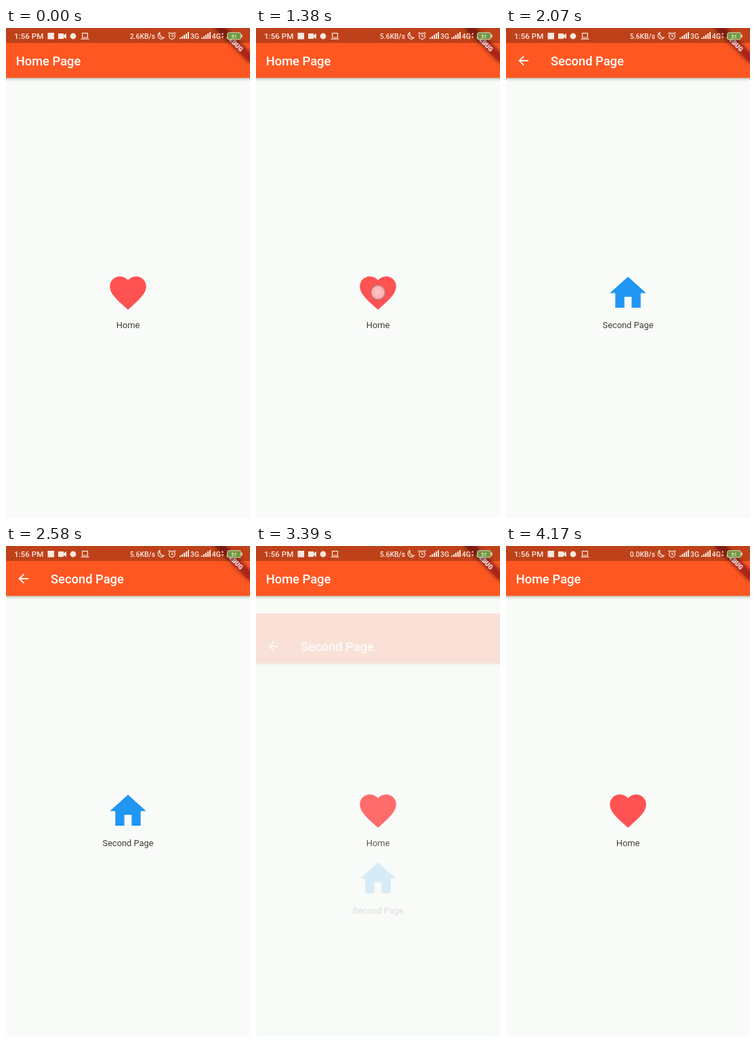
These frames come from a looping animation (360 px wide and 720 px high, 4.2 s). An HTML page:

```html
<!DOCTYPE html>
<html lang="en">
<head>
<meta charset="utf-8">
<title>Page transition</title>
<style>
  html, body { margin: 0; width: 100%; height: 100%; overflow: hidden; background: #f8fbf8; }
  svg { display: block; width: 360px; height: 720px; overflow: hidden; }
  text { font-family: Roboto, "Open Sans", sans-serif; }

  .page { fill: #f8fbf8; }
  .bar { fill: #ff5722; }
  .title { font-size: 18.33px; font-weight: 500; fill: #fff; }
  .label { font-size: 12.83px; fill: #3f3c38; text-anchor: middle; }
  .heart { fill: #ff5252; }
  .house { fill: #2196f3; }

  .status { fill: #fbe8e0; }
  .status text { font-size: 10.4px; font-weight: 500; }
  .status .clock { font-size: 11.6px; }
  .status .charge { font-size: 7.5px; text-anchor: middle; }
  .line { fill: none; stroke: #fbe8e0; stroke-width: 1.2; }
  .debug { font-size: 9.35px; font-weight: 900; fill: #fff; text-anchor: middle; }

  /* One loop is 4200 ms; the page takes 300 ms each way. */
  .second { animation: slide 4.2s infinite, fade 4.2s infinite; }
  .touch, .speed text { opacity: 0; animation: 4.2s step-end infinite; }
  .touch { animation-name: press; }
  .speed .a { animation-name: speedA; }
  .speed .b { animation-name: speedB; }
  .speed .c { animation-name: speedC; }

  @keyframes slide {
    0% { transform: translateY(180px); }
    35.238% { transform: translateY(180px); animation-timing-function: cubic-bezier(.4, 0, .2, 1); }
    42.381% { transform: translateY(0); }
    75.952% { transform: translateY(0); animation-timing-function: cubic-bezier(.8, 0, .6, 1); }
    83.095%, 100% { transform: translateY(180px); }
  }
  @keyframes fade {
    0% { opacity: 0; }
    35.238% { opacity: 0; animation-timing-function: cubic-bezier(.42, 0, 1, 1); }
    42.381% { opacity: 1; }
    75.952% { opacity: 1; animation-timing-function: cubic-bezier(0, 0, .58, 1); }
    83.095%, 100% { opacity: 0; }
  }
  @keyframes press { 0% { opacity: 0; } 32.1% { opacity: 1; } 35.2%, 100% { opacity: 0; } }
  @keyframes speedA { 0% { opacity: 1; } 7.85%, 100% { opacity: 0; } }
  @keyframes speedB { 0% { opacity: 0; } 7.85% { opacity: 1; } 90.7%, 100% { opacity: 0; } }
  @keyframes speedC { 0% { opacity: 0; } 90.7%, 100% { opacity: 1; } }
</style>
</head>
<body>
<svg viewBox="0 0 360 720" width="360" height="720">
  <defs>
    <linearGradient id="shade" x1="0" y1="0" x2="0" y2="1">
      <stop offset="0" stop-color="#000" stop-opacity=".26"/>
      <stop offset=".4" stop-color="#000" stop-opacity=".1"/>
      <stop offset="1" stop-color="#000" stop-opacity="0"/>
    </linearGradient>
    <radialGradient id="finger">
      <stop offset="0" stop-color="#fff" stop-opacity=".68"/>
      <stop offset=".7" stop-color="#fff" stop-opacity=".55"/>
      <stop offset=".84" stop-color="#9a8880" stop-opacity=".6"/>
      <stop offset="1" stop-color="#9a8880" stop-opacity="0"/>
    </radialGradient>
    <filter id="blur" x="-30%" y="-150%" width="160%" height="400%">
      <feGaussianBlur stdDeviation="3.6"/>
    </filter>
    <g id="scaffold">
      <rect class="page" width="360" height="720"/>
      <rect y="73" width="360" height="6" fill="url(#shade)"/>
      <rect class="bar" width="360" height="73.3"/>
    </g>
    <path id="signal" d="M0 16v-2h2v2zM3 16v-4h2v4zM6 16v-6h2v6zM9 16v-8h2v8zM12 16v-10h2v10z"/>
  </defs>

  <g>
    <use href="#scaffold"/>
    <text class="title" x="14.7" y="55">Home Page</text>
    <path class="heart" transform="translate(147.9 357) scale(2.674)"
      d="M12 21.35l-1.45-1.32C5.4 15.36 2 12.28 2 8.5 2 5.42 4.42 3 7.5 3c1.74 0 3.41.81 4.5 2.09C13.09 3.81 14.76 3 16.5 3 19.58 3 22 5.42 22 8.5c0 3.78-3.4 6.86-8.55 11.54z"/>
    <text class="label" x="180" y="441">Home</text>
  </g>

  <g class="second">
    <use href="#scaffold"/>
    <path fill="#fff" transform="translate(14.7 37) scale(.917)"
      d="M20 11H7.83l5.59-5.59L12 4l-8 8 8 8 1.41-1.41L7.83 13H20z"/>
    <text class="title" x="66" y="55">Second Page</text>
    <path class="house" transform="translate(147.9 357.5) scale(2.674)" d="M10 20v-6h4v6h5v-8h3L12 3 2 12h3v8z"/>
    <text class="label" x="180" y="441">Second Page</text>
  </g>

  <g transform="translate(360) rotate(45)">
    <rect x="-36.67" y="25.67" width="73.34" height="11" opacity=".5" filter="url(#blur)"/>
    <rect x="-36.67" y="25.67" width="73.34" height="11" fill="#b71c1c" fill-opacity=".627"/>
    <text class="debug" y="34.5">DEBUG</text>
  </g>

  <rect width="360" height="22" fill-opacity=".25"/>
  <g class="status">
    <text class="clock" x="12" y="16">1:56 PM</text>
    <rect x="61.5" y="7" width="9.5" height="9.5"/>
    <path d="M77 8h8v2.5l4-2.5v8l-4-2.5v2.5h-8z"/>
    <circle cx="99" cy="12" r="4.4"/>
    <path class="line" d="M112.6 7.6h7.8v6.4h-7.8zM110.5 16.2h12"/>
    <g class="speed">
      <text class="a" x="182.7" y="15.5">2.6KB/s</text>
      <text class="b" x="182.7" y="15.5">5.6KB/s</text>
      <text class="c" x="182.7" y="15.5">0.0KB/s</text>
    </g>
    <path class="line" d="M227 6.6a5 5 0 1 0 6.3 7.4a5.6 5.6 0 0 1-6.3-7.4z"/>
    <circle class="line" cx="245" cy="12" r="4.3"/>
    <path class="line" d="M245 9.5v2.8h2M239.5 8.3l2.6-2.2M250.5 8.3l-2.6-2.2"/>
    <use href="#signal" x="256"/>
    <text x="272" y="15.5">3G</text>
    <use href="#signal" x="288"/>
    <text x="303.8" y="15.5">4G</text>
    <path d="M318 9.5l1.6-2.5 1.6 2.5zM318 12.5l1.6 2.5 1.6-2.5z"/>
    <rect x="326.7" y="6.8" width="19.6" height="10" rx="2" fill="#6d9a3f" stroke="#e3d3bd" stroke-width="1"/>
    <rect x="347" y="9.5" width="1.7" height="4.6" rx=".6" fill="#e3d3bd"/>
    <text class="charge" x="336.5" y="14.5">51</text>
  </g>

  <circle class="touch" cx="180" cy="388.5" r="12.5" fill="url(#finger)"/>
</svg>
</body>
</html>
```
